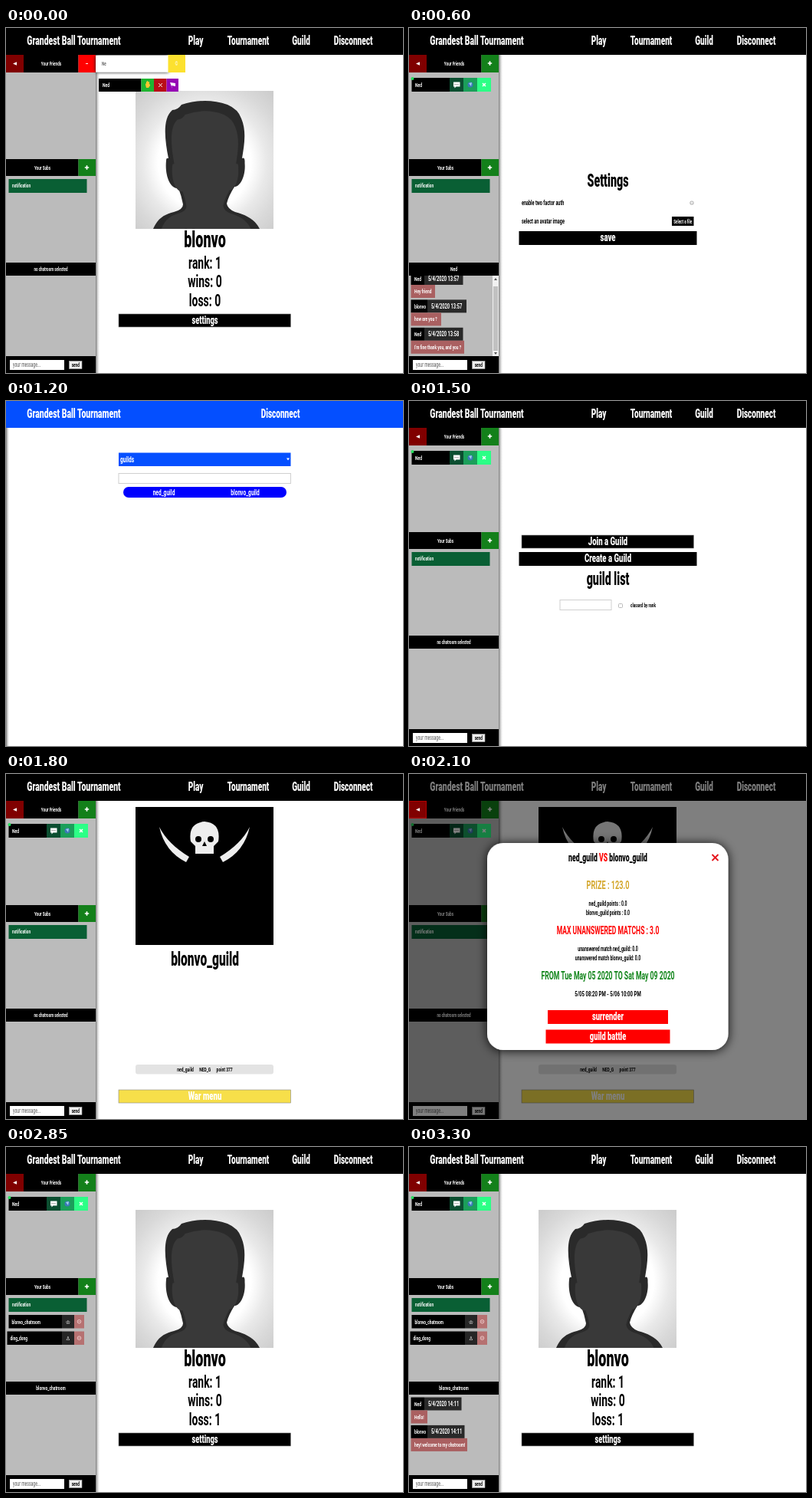
An HTML page that plays this animation: 518 by 450 pixels, repeating every 3450 ms.

```html
<!DOCTYPE html>
<html>
<head>
<meta charset="utf-8">
<style>
html, body { margin: 0; width: 100%; height: 100%; overflow: hidden; background: #fff; }
svg { display: block; width: 518px; height: 450px; }
text { font-family: Roboto, "DejaVu Sans", sans-serif; white-space: pre; }
</style>
</head>
<body>
<svg id="stage" viewBox="0 0 518 450"></svg>
<script>
const STEP = 150, COUNT = 23, CONDENSE = 0.62, MID = 259.5;
const ME = 'blonvo', PAL = 'Ned';
const stage = document.getElementById('stage');

const box = (x, y, w, h, fill, extra = '') =>
  `<rect x="${x}" y="${y}" width="${w}" height="${h}" fill="${fill}" ${extra}/>`;
const path = (d, fill, extra = '') => `<path d="${d}" fill="${fill}" ${extra}/>`;
const dot = (x, y, r, fill) => `<circle cx="${x}" cy="${y}" r="${r}" fill="${fill}"/>`;
// The whole interface is set in one condensed face.
const text = (s, x, y, size, fill = '#000', anchor = 'middle', weight = 700) =>
  `<text transform="translate(${x} ${y}) scale(${CONDENSE} 1)" font-size="${size}" fill="${fill}" text-anchor="${anchor}" font-weight="${weight}">${s}</text>`;
const left = (s, x, y, size, fill, weight) => text(s, x, y, size, fill, 'start', weight);
const bold = (s, x, y, size, fill) => text(s, x, y, size, fill, 'middle', 900);
const glyph = (s, x, y, size, fill = '#fff') =>
  `<text x="${x}" y="${y}" font-size="${size}" fill="${fill}" text-anchor="middle">${s}</text>`;
const field = (x, y, w, h) => box(x + .5, y + .5, w - 1, h - 1, '#fff', 'stroke="#d0d0d0"');
const cross = (x, y, r, color, w) =>
  path(`M${x - r} ${y - r}l${2 * r} ${2 * r}m0 ${-2 * r}l${-2 * r} ${2 * r}`, 'none', `stroke="${color}" stroke-width="${w}"`);
const plus = (x, y, r = 2.7) =>
  path(`M${x - r} ${y}h${2 * r}M${x} ${y - r}v${2 * r}`, 'none', 'stroke="#fff" stroke-width="1.7"');
const check = (x, y, on) => box(x + .5, y + .5, 5, 5, '#fff', 'rx="1" stroke="#aaa" stroke-width=".8"') +
  (on ? path(`M${x + 1.5} ${y + 3}l1.2 1.5 2-3`, 'none', 'stroke="#222"') : '');
const button = (s, y, grown, fill = '#000', size = 15.5) =>
  (grown ? box(143.5, y, 232, 18, fill) : box(147, y, 224.5, 17, fill, 'stroke="#888" stroke-width=".6"')) +
  bold(s, MID, y + 13, size, '#fff');

const defs = `<defs>
  <radialGradient id="halo" cy=".52" r=".7"><stop offset=".48" stop-color="#fff"/><stop offset=".64" stop-color="#e9e9e9"/><stop offset=".82" stop-color="#d9d9d9"/><stop offset="1" stop-color="#cdcdcd"/></radialGradient>
  <linearGradient id="edge"><stop stop-color="#777"/><stop offset="1" stop-color="#fff" stop-opacity="0"/></linearGradient>
  <filter id="soft" x="-10%" y="-50%" width="120%" height="200%"><feDropShadow dx="0" dy="0" stdDeviation="2" flood-opacity="1"/></filter>
  <filter id="deep"><feDropShadow dx="0" dy="1" stdDeviation="7" flood-opacity=".9"/></filter>
  <clipPath id="chat"><rect y="323" width="117" height="105"/></clipPath>
</defs>`;

function header(fill, links) {
  return box(0, 0, 518, 35, fill) + bold('Grandest Ball Tournament', 88.5, 22, 16.8, '#fff') +
    links.map(([s, x]) => bold(s, x, 22, 16.2, '#fff')).join('');
}
const mainHeader = () => header('#000', [['Play', 247.5], ['Tournament', 316], ['Guild', 385], ['Disconnect', 453]]);

function message([who, date, words, wide, wordsWide], y) {
  const nameEnd = who === PAL ? 20 : 24;
  return box(2.5, y, nameEnd - 2.5, 17, '#000') + box(nameEnd, y, wide - nameEnd, 17, '#292929') +
    left(who, 7, y + 11.5, 8, '#fff') + left(date, nameEnd + 5, y + 11.5, 9.3, '#fff') +
    box(2.5, y + 17, wordsWide - 2.5, 17, '#aa6061') + left(words, 7, y + 28, 7.8, '#fff');
}

function chat(title, list, top, scroll) {
  return text(title, 58.5, 317, 8, '#fff') + `<g clip-path="url(#chat)">` +
    list.map((m, i) => message(m, top + i * 36.4)).join('') +
    (scroll ? box(109, 323, 8, 105, '#f1f1f1') + box(110, 337, 6, 84, '#c1c1c1') +
      path('M111 329l2-3 2 3zM111 423l2 3 2-3z', '#555') : '') + '</g>';
}

function friend() {
  return box(3.5, 65, 49.5, 18, '#000') + left(PAL, 8, 76.5, 8, '#fff') +
    box(53, 65, 18, 18, '#0b4e30') + box(71, 65, 18, 18, '#1b9f5a') + box(89, 65, 18, 18, '#2cff86') +
    path('M58 70.5h8.5v6h-5l-2 2v-2h-1.5z', '#fff') + [60, 62, 64].map(x => dot(x, 73.5, .6, '#555')).join('') +
    dot(80, 74, 3.5, '#3c78b8') + path('M78 72l4-1-1 5z', '#9fd0e8') +
    cross(98, 74, 2, '#fff', 1.6) + dot(4.5, 66, 2, '#24e05c');
}

function room(name, x, y, icon) {
  return box(x, y, 73 - x, 17.5, '#000') + left(name, x + 4, y + 11.5, 7.8, '#fff') +
    box(73, y, 16, 17.5, '#262626') + glyph(icon, 81, y + 11.5, 7) +
    box(89, y, 13, 17.5, '#b67171') + `<circle cx="95.5" cy="${y + 8.7}" r="2.3" fill="none" stroke="#f7dada" stroke-width=".8"/>` +
    path(`M94.5 ${y + 8.7}h2`, 'none', 'stroke="#f7dada" stroke-width=".8"');
}

const back = () => box(0, 35, 23, 23, '#800000') + path('M9 46.5l5-2.3v4.6z', '#fff');

function sidebar({ pal = true, search, subs, rooms = 0, talk }) {
  const bar = (s, x, y, h, open) => box(0, y, 94.5, h, '#000') + text(s, x, y + 13.5, 7.5, '#fff') +
    box(94.5, y, 22.5, h, open ? '#f00' : '#13801a') +
    (open ? box(104, y + 11, 3, 1, '#fff') : plus(105.5, y + 11));
  return box(117, 35, 6, 415, 'url(#edge)') + box(0, 35, 117, 415, '#bbb') +
    bar('Your Friends', 59, 35, 23, search) + back() + bar('Your Subs', 47.5, 171, 22, subs) + (pal ? friend() : '') +
    box(3.5, 197, 102, 18, '#095f34') + left('notification', 8, 208, 7.6, '#fff') +
    (rooms > 0 ? room(ME + '_chatroom', 3.5, 219, '♔') : '') +
    (rooms > 1 ? room('ding_dong', 1.5, 240.5, '♙') : '') +
    box(0, 306, 117, 17, '#000') + (talk || text('no chatroom selected', 58.5, 317, 7.3, '#fff')) +
    box(0, 428, 117, 22, '#000') + box(5, 433, 71, 13, '#fff') + left('your message...', 9, 442, 8.2, '#777', 500) +
    box(82.5, 434.5, 16.5, 10, '#eee', 'stroke="#aaa" stroke-width=".6"') + text('send', 90.7, 442, 7.5);
}

const yellow = (x, y, h) => box(x, y, 22.5, h, '#fce12f') + text('©', x + 11, y + 14, 8, '#fff');

function searchPanel() {
  return `<g filter="url(#soft)">${box(117, 36, 95, 21.5, '#fff')}</g>` + left('Ne', 125, 49, 7.5, '#555', 500) + yellow(211.5, 35, 23) +
    box(121, 66, 55.5, 17, '#000') + left(PAL, 126, 77, 8, '#fff') +
    box(176.5, 66, 16.5, 17, '#1fb531') + box(193, 66, 16.5, 17, '#b90d18') + box(209.5, 66, 15.5, 17, '#9606b4') +
    path('M182 74v-2l1 1v-3h1v-1h1v1h2v4l1-1v2l-2 3h-3z', '#ffc52e') +
    cross(201.5, 74.5, 2.3, '#fff', 1) + path('M214 71l7 1v4l-5-1 1 4z', '#fff');
}

function roomPanel(password) {
  return `<g filter="url(#soft)">${box(117, 171, 72, 22, '#fff')}</g>` +
    box(189, 171, 22.5, 22.5, '#0a32f5') + dot(200.5, 182, 3.7, '#ffca35') + dot(199, 181, .6, '#553') + dot(202, 181, .6, '#553') +
    path('M198.7 183q1.8 1.8 3.6 0', 'none', 'stroke="#553" stroke-width=".6"') + yellow(211.5, 171, 22.5) +
    box(121, 197, 85, 18, '#000') + text('create your chatroom', 163, 208, 7.3, '#fff') +
    box(206, 197, 17, 18, '#27b637') + plus(214.5, 206, 2) +
    field(121, 219, 85, 18) + left(ME + '_chatroom', 125, 230, 7.8) +
    field(121, 240, 85, 18) + (password ? left('1234|', 125, 251, 8) : '') +
    check(121, 265, password) + left('password', 130, 270.5, 7.7, '#000', 500) +
    check(155, 265) + left('private', 165, 270.5, 7.7, '#000', 500);
}

const HEAD = `M192 262C198 248 207 243 219 240Q231 237 231 230Q229 219 225 209C214 210 207 192 209 173Q209 169 212 170
  C207 145 204 118 217 107Q224 107 229 100Q260 90 289 100Q303 106 307 118C314 134 311 152 308 170
  Q312 168 311.5 176C313 192 306 207 298 207Q290 220 288 229Q289 236 299 240C314 244 325 250 331 262Z`;
function profile(loss) {
  return box(169, 82, 180, 180, 'url(#halo)') + path(HEAD, '#2a2a2a') +
    `<g transform="translate(259 262) scale(.84 .92) translate(-259 -262)">${path(HEAD, '#393939')}</g>` +
    bold(ME, MID, 286, 29) + text('rank: 1', MID, 314, 22.5) + text('wins: 0', MID, 338, 22.5) +
    text('loss: ' + loss, MID, 362.5, 22.5) + button('settings', 373, false, '#000', 15);
}

function settings() {
  return bold('Settings', MID, 207, 23) + left('enable two factor auth', 147, 231, 8.9) +
    dot(369, 228, 2.6, '#aaa') + dot(369, 228, 1.8, '#eee') +
    left('select an avatar image', 147, 255, 8.9) + box(343, 246, 28.5, 12, '#000') +
    text('Select a file', 357.2, 254.5, 7.4, '#fff') + button('save', 265, true);
}

function guildList() {
  return button('Join a Guild', 175) + button('Create a Guild', 197, true) + bold('guild list', MID, 240, 23) +
    field(196.5, 259, 68, 14) + check(273, 264) + left('classed by rank', 289, 269, 7.6);
}

function guild() {
  const blade = path('M200 69Q211 91 239 108L235 115Q207 101 200 69Z', '#eee');
  const skull = path('M241 88Q237 64 259 62Q281 64 277 88L271 94V104H247V94Z', '#eee') +
    dot(251, 85, 4, '#000') + dot(267, 85, 4, '#000') + path('M259 88l-3 6h6z', '#000');
  return box(169, 43, 180, 180, '#000') + blade + `<g transform="translate(518) scale(-1 1)">${blade}</g>` + skull +
    bold(ME + '_guild', MID, 250, 25) + box(169, 379, 180, 12.5, '#e3e3e3', 'rx="3"') +
    text('ned_guild      NED_G      point 377', MID, 387.5, 8) + button('War menu', 412, false, '#f7df4a');
}

function warMenu() {
  return box(0, 0, 518, 450, '#000', 'opacity=".5"') + back() + box(.5, 35.5, 22, 22, 'none', 'stroke="#b00000"') +
    box(102, 90, 314.5, 270, '#fff', 'rx="21" filter="url(#deep)"') +
    bold(`ned_guild <tspan fill="#f00">VS</tspan> ${ME}_guild`, MID, 113.5, 14) + cross(399.5, 109, 4, '#e5141c', 1.8) +
    text('PRIZE : 123.0', MID, 150, 14.8, '#d4a72c') +
    text('ned_guild points : 0.0', MID, 172, 8.4) + text(ME + '_guild points : 0.0', MID, 184, 8.4) +
    text('MAX UNANSWERED MATCHS : 3.0', MID, 209, 13.8, '#f00') +
    text('unanswered match ned_guild: 0.0', MID, 231, 8.4) + text(`unanswered match ${ME}_guild: 0.0`, MID, 243, 8.4) +
    text('FROM Tue May 05 2020 TO Sat May 09 2020', MID, 268, 14, '#11851a') +
    text('5/05 08:20 PM - 5/06 10:00 PM', MID, 290, 9.8) +
    box(181, 308, 157, 18, '#f00') + bold('surrender', MID, 321, 15, '#fff') +
    box(178.5, 333.5, 162, 18, '#f00') + bold('guild battle', MID, 347, 15, '#fff');
}

function admin(kind, query, rows) {
  const pill = ([a, b], i) => box(153, 112 + i * 18.7, 213, 14, '#0000fe', 'rx="7"') +
    text(a, 206, 122.7 + i * 18.7, 10.7, '#fff') + text(b, 312, 122.7 + i * 18.7, 10.7, '#fff');
  return box(0, 35, 5, 415, 'url(#edge)') + header('#044fff', [['Disconnect', 358]]) +
    box(147, 67.5, 224.5, 17.5, '#044fff') + left(kind, 149, 79.5, 10.7, '#fff') + path('M366 74.5h4l-2 3z', '#fff') +
    field(146.5, 94, 225.5, 14) + left(query, 150, 104.5, 9) + rows.map(pill).join('');
}

const palTalk = [
  [PAL, '5/4/2020 13:57', 'Hey friend', 70.5, 34],
  [ME, '5/4/2020 13:57', 'how are you ?', 75, 42],
  [PAL, '5/4/2020 13:58', "I'm fine thank you, and you ?", 70.5, 72]
];
const roomTalk = [
  [PAL, '5/4/2020 14:11', 'Hello!', 68.5, 24],
  [ME, '5/4/2020 14:11', 'hey! welcome to my chatroom!', 72.5, 76]
];
const palChat = n => chat(PAL, palTalk.slice(0, n), n > 2 ? 318 : 327, n > 2);
const roomChat = n => chat(ME + '_chatroom', roomTalk.slice(0, n), 326.5);
const page = (main, side = {}, over = '') => main + sidebar(side) + mainHeader() + over;

function scene(i) {
  if (i === 0) return page(profile(0), { pal: false, search: true }, searchPanel());
  if (i === 1) return page(profile(0));
  if (i < 4) return page(profile(0), { talk: palChat(i) });
  if (i < 6) return page(settings(), { talk: palChat(3) });
  if (i === 6) return admin('users', '', [['kdorvane', PAL], ['tulvet', ME]]);
  if (i === 7) return admin('users', 'Ne', [[PAL, '']]);
  if (i === 8) return admin('guilds', '', [['ned_guild', ME + '_guild']]);
  if (i === 9) return page(profile(1));
  if (i < 12) return page(guildList());
  if (i < 14) return page(guild());
  if (i === 14) return page(guild(), {}, warMenu());
  if (i < 17) return page(profile(1), { subs: true }, roomPanel(i === 16));
  const said = Math.max(0, i - 19);
  return page(profile(1), { rooms: i - 16, talk: i > 18 && roomChat(said) });
}

let shown = -1;
const start = performance.now();
function tick() {
  const i = Math.floor((performance.now() - start) / STEP) % COUNT;
  if (i !== shown) stage.innerHTML = defs + scene(shown = i);
  requestAnimationFrame(tick);
}
tick();
</script>
</body>
</html>
```
